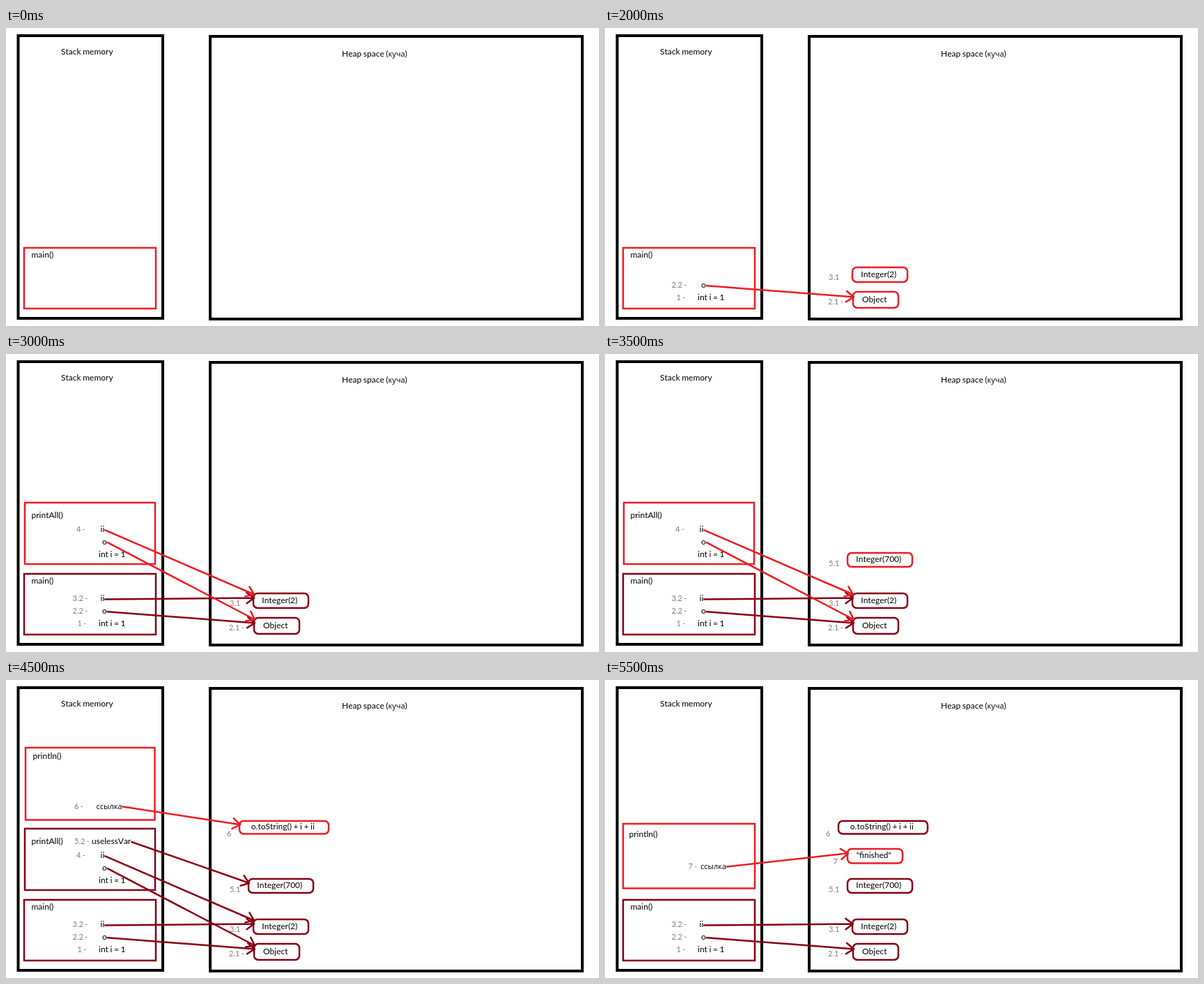
An HTML page that plays this animation: 851x427 px, repeating every 6000 ms.

```html
<!DOCTYPE html>
<html lang="ru">
<head>
<meta charset="utf-8">
<title>Stack and heap</title>
<style>
  html, body { margin: 0; width: 100%; height: 100%; overflow: hidden; background: #fff; }
  svg { display: block; width: 851px; height: 427px; }
  text { font: 12px Lato, "Open Sans", sans-serif; font-kerning: none; word-spacing: -.5px; fill: #000; white-space: pre; }
  .num { font-size: 11px; fill: #7f7f7f; }
  .mid { text-anchor: middle; }
  .cyr { font: 11px "Open Sans", sans-serif; }
  .wall { fill: none; stroke: #000; stroke-width: 4; }
  .pen { fill: none; stroke: #880015; stroke-width: 2.5; stroke-linecap: round; stroke-linejoin: round; }
  .box { stroke-linejoin: miter; }
  .hot .pen { stroke: #ed1c24; }
</style>
</head>
<body>
<svg id="stage" viewBox="0 0 851 427">
  <rect class="wall" x="17.5" y="11" width="207.5" height="405"/>
  <rect class="wall" x="293" y="12" width="534" height="405"/>
  <text x="79" y="38">Stack memory</text>
  <text x="482" y="41">Heap space (<tspan class="cyr">куча</tspan>)</text>
</svg>
<script>
const STEP = 500, STEPS = 12, LAST = STEPS - 1;
const ROW = 17.8;              // distance between variables in a frame
const BARB = 13, SPREAD = 0.63; // arrow head length and half angle
const stage = document.getElementById('stage');
const parts = [];

function add(parent, tag, attrs, text) {
  const el = document.createElementNS('http://www.w3.org/2000/svg', tag);
  for (const key in attrs) el.setAttribute(key, attrs[key]);
  if (text) el.textContent = text;
  return parent.appendChild(el);
}

const label = (g, x, y, text, kind = '') =>
  add(g, 'text', { x, y, class: /[а-я]/.test(text) ? 'cyr' : kind }, text);

const box = (g, x, y, width, height, rx = 0) =>
  add(g, 'rect', { x, y, width, height, rx, class: rx ? 'pen' : 'pen box' });

function arrow(g, x, y, tipX, tipY) {
  const back = Math.atan2(y - tipY, x - tipX);
  const barb = a => [tipX + BARB * Math.cos(back + a), tipY + BARB * Math.sin(back + a)];
  const d = `M${x},${y}L${tipX},${tipY}M${barb(SPREAD)}L${tipX},${tipY}L${barb(-SPREAD)}`;
  add(g, 'path', { d, class: 'pen' });
}

// A group visible on steps from..to, bright while hot(step) holds
function part({ from, to = LAST, hot }) {
  const el = add(stage, 'g', {});
  parts.push({ el, from, to, hot });
  return el;
}

function heapObject(life, text, x, y, w, h, tag, tagX, tagY) {
  const g = part(life), mid = y + h / 2;
  box(g, x, y, w, h, 6);
  label(g, x + w / 2 - 1.7, mid + 3, text, 'mid');
  label(g, tagX, tagY, tag, 'num');
  return { x: x + 1, y: mid - 4, refs: 0 };
}

function stackFrame(life, name, x, y, w, h, textX, textY) {
  const g = part(life);
  box(g, x, y, w, h);
  label(g, textX, textY, name);
}

// Each further reference to an object lands a little higher on it
function variable(life, text, x, y, tag, tagX, target) {
  const g = part(life);
  const width = label(g, x, y, text).getComputedTextLength();
  if (tag) label(g, tagX, y, tag, 'num');
  if (target) arrow(g, x + width + 1, y - 3, target.x, target.y - 5 * target.refs++);
}

const inMain = from => ({ from, hot: s => s < 6 || s === 10 });
const inPrintAll = (from, to) => ({ from, to, hot: s => s < 9 });
const inPrintln = (from, to) => ({ from, to, hot: s => s === from });

const object = heapObject(inMain(2), 'Object', 356, 378, 65, 23, '2.1 -', 320, 396);
const two = heapObject(inMain(4), 'Integer(2)', 355, 343, 79, 21, '3.1', 321, 361);
const useless = heapObject(inPrintAll(7), 'Integer(700)', 348, 285, 93, 20, '5.1', 321, 304);
const joined = heapObject(inPrintln(9), 'o.toString() + i + ii', 335, 202, 128, 18.5, '6', 317, 224);
const finished = heapObject(inPrintln(11), '"finished"', 348, 242, 79, 20.5, '7', 327.5, 264);

stackFrame(inMain(0), 'main()', 26, 315, 189, 87, 36.5, 329);
variable(inMain(1), 'int i = 1', 133, 390, '1 -', 102.5);
variable(inMain(3), 'o', 138, 390 - ROW, '2.2 -', 95.5, object);
variable(inMain(5), 'ii', 135.5, 390 - 2 * ROW, '3.2 -', 95.5, two);

const call = inPrintAll(6, 9);
stackFrame(call, 'printAll()', 27, 213, 187, 88, 36.5, 235);
variable(call, 'int i = 1', 133, 291);
variable(call, 'o', 138, 291 - ROW, '', 0, object);
variable(call, 'ii', 135.5, 291 - 2 * ROW, '4 -', 101, two);
variable(inPrintAll(8, 9), 'uselessVar', 123, 235, '5.2 -', 98, useless);

stackFrame(inPrintln(9, 9), 'println()', 28, 97, 185.5, 103.5, 38.5, 113);
variable(inPrintln(9, 9), 'ссылка', 129.5, 184.5, '6 -', 98, joined);

stackFrame(inPrintln(11), 'println()', 26, 206, 189, 92.5, 34.5, 225);
variable(inPrintln(11), 'ссылка', 137, 270.5, '7 -', 119.5, finished);

let shown = -1;
function show(step) {
  if (step === shown) return;
  shown = step;
  for (const { el, from, to, hot } of parts) {
    el.style.display = step >= from && step <= to ? '' : 'none';
    el.setAttribute('class', hot(step) ? 'hot' : '');
  }
}

const start = performance.now();
function tick() {
  show(Math.floor((performance.now() - start) / STEP) % STEPS);
  requestAnimationFrame(tick);
}
tick();
</script>
</body>
</html>
```
